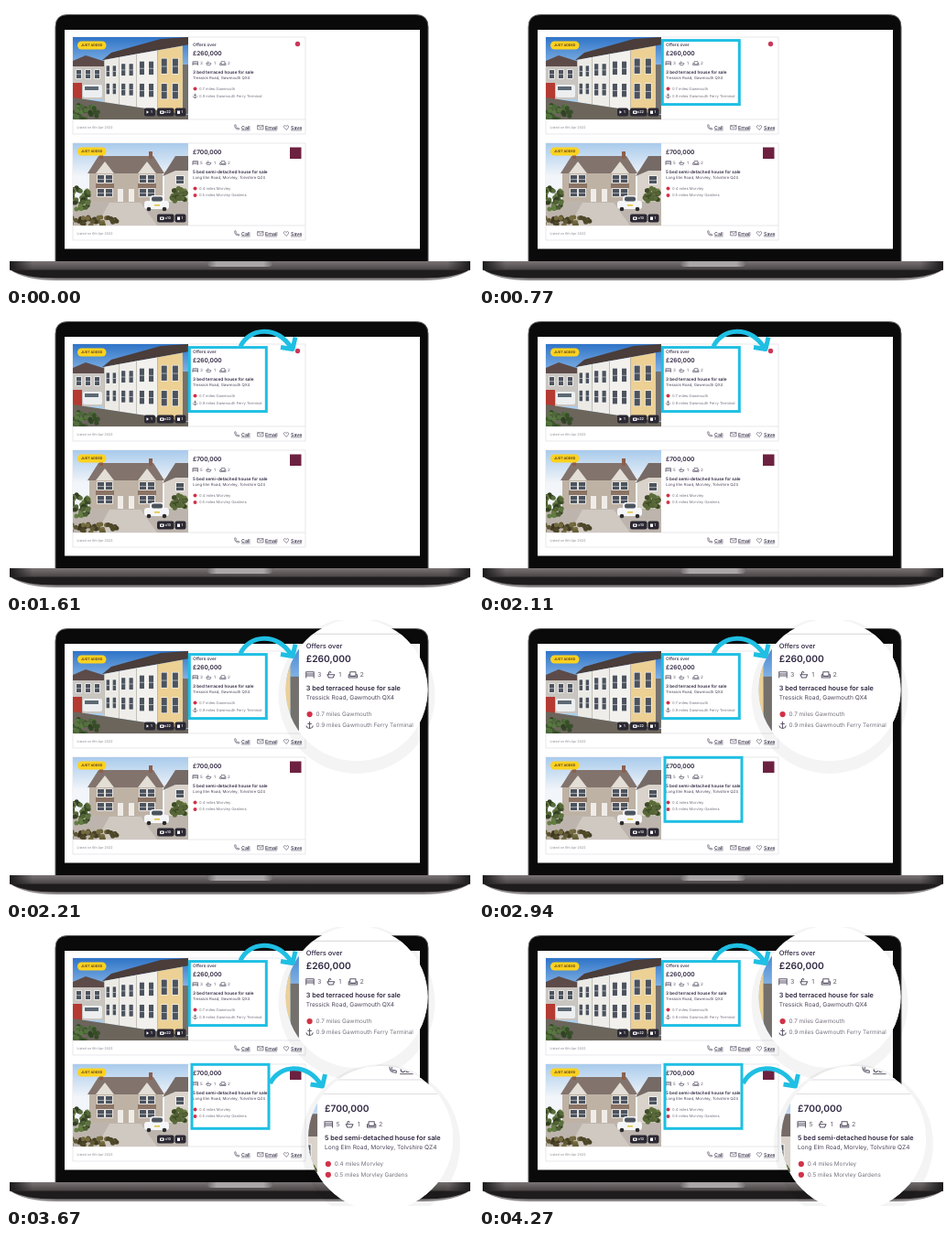
Recreate the animation shown at these times as an HTML page. Size 510 px wide and 305 px high, loop 5 s.

```html
<!DOCTYPE html>
<html lang="en">
<head>
<meta charset="utf-8">
<title>Property listings</title>
<style>
  html, body { margin: 0; width: 100%; height: 100%; overflow: hidden; background: #fff; }
  svg { display: block; width: 100%; height: 100%; }
  text { font-family: Inter, sans-serif; text-rendering: geometricPrecision; }
  .line { fill: none; stroke: #5b5468; stroke-width: .65; stroke-linecap: round; stroke-linejoin: round; }
  .blue { fill: none; stroke: #1fbfe3; stroke-width: 3; }
  .arrow { stroke-width: 5; stroke-linejoin: round; }
</style>
</head>
<body>
<svg viewBox="0 0 510 305">
  <defs>
    <linearGradient id="deck" x2="0" y2="1">
      <stop offset="0" stop-color="#7a7475"/><stop offset="1" stop-color="#484344"/>
    </linearGradient>
    <linearGradient id="ends">
      <stop offset="0" stop-color="#1b191a"/><stop offset=".05" stop-color="#1b191a" stop-opacity="0"/>
      <stop offset=".95" stop-color="#1b191a" stop-opacity="0"/><stop offset="1" stop-color="#1b191a"/>
    </linearGradient>
    <linearGradient id="notch">
      <stop offset="0" stop-color="#6b6667"/><stop offset=".15" stop-color="#aaa5a6"/>
      <stop offset=".85" stop-color="#aaa5a6"/><stop offset="1" stop-color="#6b6667"/>
    </linearGradient>
    <linearGradient id="sky" x2="0" y2="1">
      <stop offset="0" stop-color="#2f74c8"/><stop offset=".5" stop-color="#a9cff1"/>
    </linearGradient>
    <linearGradient id="haze" x2="0" y2="1">
      <stop offset="0" stop-color="#a9cbec"/><stop offset=".4" stop-color="#f2f5f9"/>
    </linearGradient>
    <clipPath id="photoClip"><rect width="126" height="90"/></clipPath>
  </defs>

  <g id="laptop">
    <path d="M54 280V23Q54 9.500 67.500 9.500H447.500Q461 9.500 461 23V280Z" fill="#0b0a0b" stroke="#5d5a5e"/>
    <path d="M64 26H452V265.500H64Z" fill="#fff"/>
    <path d="M4 288H507Q490 300 455 300H55Q20 300 4 288Z" fill="#8d8889"/>
    <path d="M4 288H507Q490 297.500 455 297.500H55Q20 297.500 4 288Z" fill="#1f1c1d"/>
    <path d="M4 279H507V288.500H4Z" fill="url(#deck)"/>
    <path d="M4 279H507V288.500H4Z" fill="url(#ends)"/>
    <path d="M219 279H292Q292 285 286 285H225Q219 285 219 279Z" fill="url(#notch)"/>
  </g>
  <g id="page"></g>
  <g id="overlays"></g>
</svg>
<script>
const LOOP = 5000;
const ZOOM = 1.55;
const INK = '#2f2640', GREY = '#77727f';
const byId = id => document.getElementById(id);
const repeat = (n, draw) => Array.from({ length: n }, (_, i) => draw(i)).join('');

// Text whose vertical centre sits on y
const label = (x, y, size, str, fill = INK, weight = 400, extra = '') =>
  `<text x="${x}" y="${y + size * .36}" font-size="${size}" fill="${fill}" font-weight="${weight}" ${extra}>${str}</text>`;
const box = (x, y, w, h, fill, r = 0) =>
  `<rect x="${x}" y="${y}" width="${w}" height="${h}" rx="${r}" fill="${fill}"/>`;
const disc = (x, y, r, fill) => `<circle cx="${x}" cy="${y}" r="${r}" fill="${fill}"/>`;
const poly = (points, fill) => `<polygon points="${points}" fill="${fill}"/>`;
const line = d => `<path class="line" d="${d}"/>`;
const at = (x, y, content) => `<g transform="translate(${x} ${y})">${content}</g>`;

let seed = 7;
const random = () => (seed = seed * 16807 % 2147483647) / 2147483647;

const pane = (x, y, w, h) => box(x - .7, y - .7, w + 1.4, h + 1.4, '#f7f7f5') +
  box(x, y, w, h, '#4c535e') + box(x, y + h / 2, w, .6, '#dfe2e4');
const bush = (cx, cy, rx, ry, hue) => repeat(40, () => {
  const angle = random() * 2 * Math.PI, reach = Math.sqrt(random());
  return disc(cx + rx * reach * Math.cos(angle), cy + ry * reach * Math.sin(angle), 2.5,
    `hsl(${hue} 30% ${18 + 20 * random()}%)`);
});

// Row of houses in perspective, each wider than the one before
function terrace() {
  const eave = x => 31 - x * .18, ground = x => 66 + x * .15;
  const house = i => {
    const x = 34 + 80 * (1.2 ** i - 1), w = 16 * 1.2 ** i, end = x + w;
    const top = eave(x), h = ground(x) - top;
    const wall = i < 3 ? `hsl(45 15% ${91 + i * 1.5}%)` : '#ecd094';
    return poly([x, top, end, eave(end), end, ground(end), x, ground(x)], wall) +
      box(x, top, .8, h, '#b9b4aa') +
      repeat(4, k => pane(x + w * (.16 + .44 * (k % 2)), top + h * (.14 + .42 * (k >> 1)), w * .22, h * .25));
  };
  return box(0, 0, 126, 90, 'url(#sky)') +
    box(0, 30, 36, 38, '#c9c5c1') + poly('0,26 14,20 36,27 36,32 0,32', '#5d4b49') +
    repeat(3, i => pane(4 + i * 10, 36, 5, 9)) +
    box(0, 50, 10, 20, '#b53a32') + box(11, 52, 21, 14, '#eceeef', 2) + box(13, 54, 15, 4, '#5d6973') +
    poly([32, eave(32), 42, 17, 96, 2, 126, 0, 126, eave(126)], '#4a3d3a') +
    repeat(4, house) + box(120, 30, 6, 54, '#74706c') +
    poly([0, 66, 30, ground(30), 126, ground(126), 126, 90, 0, 90], '#6b655c') +
    bush(10, 82, 18, 9, 95);
}

// A pair of mirrored house halves behind a drive
function semi() {
  const half = box(0, 30, 40, 35, '#beb2a5') + poly('0,14 30,14 42,33 0,33', '#82736d') +
    box(25, 9, 4, 8, '#8c5f4d') + poly('13,33 23,20 33,33', '#e3ded6') +
    box(13, 44, 20, 5, '#8b7465') + box(3, 50, 6, 15, '#efece8') +
    repeat(4, k => pane(15 + 9 * (k % 2), 35 + 15 * (k >> 1), 7, 8));
  const car = box(0, 6, 27, 9, '#f5f6f7', 3) + box(6, 0, 16, 10, '#f5f6f7', 4) +
    box(8, 1.5, 12, 5, '#4b535d', 2) + disc(5, 15, 2.3, '#2b2b2e') + disc(22, 15, 2.3, '#2b2b2e') +
    box(11, 10, 6, 1.6, '#e1c543');
  return box(0, 0, 126, 90, 'url(#haze)') +
    box(100, 30, 26, 36, '#d9d3cb') + poly('98,36 112,14 126,14 126,30 112,30', '#756a66') + pane(113, 36, 8, 8) +
    at(58, 0, half + `<g transform="scale(-1 1)">${half}</g>`) +
    box(0, 64, 126, 26, '#bdb5ad') + poly('40,65 74,65 92,90 26,90', '#d0c9c2') +
    bush(8, 60, 11, 13, 85) + bush(116, 57, 9, 8, 80) + bush(20, 85, 28, 5, 48) + at(78, 57, car);
}

const counter = (x, w, str, icon) => at(x, 77.5,
  box(0, 0, w, 9, '#2b2833', 2) + icon + label(w - 3.5, 4.5, 3.8, str, '#fff', 600, 'text-anchor="end"'));
const photo = (scene, shots, video) => `<g clip-path="url(#photoClip)">${scene}</g>` +
  box(5, 4.5, 31.5, 9, '#fdd21f', 4.5) +
  label(20.7, 9, 3.7, 'JUST ADDED', '#4a3327', 600, 'text-anchor="middle"') +
  (video ? counter(78, 12, '1', poly('2.5,2.7 5,4.5 2.5,6.3', '#fff')) : '') +
  counter(92, 18.5, shots, box(3, 3, 4.6, 3.4, '#fff', .8) + disc(5.3, 4.7, 1, '#2b2833')) +
  counter(111.5, 12, '1', box(2.5, 3, 3, 3.4, '#fff'));

const icons = {
  bed: line('M0 2V-2H5.500V2M0 .800H5.500M0-.600H5.500'),
  bath: line('M0 0H5L4 2H1ZM1 0V-1.500Q1.800-2.700 2.500-1.500'),
  sofa: line('M1 0V-2H5V0M0 0H1V1H5V0H6V2H0Z'),
  anchor: line('M0-2.300V2.300M-1.200-.800H1.200M-2.300 .600Q-2 2.300 0 2.300Q2 2.300 2.300 .600'),
  phone: line('M-2.300-2.400Q-2.500 2.500 2.500 2.300V1L1 .500L0 1L-1-.500L-.500-1.500L-1.200-2.700Z'),
  mail: line('M-3-2H3V2.200H-3ZM-3-2L0 .600L3-2'),
  heart: line('M0 2.600L-2.500 0C-3.500-1.300-1.500-3.500 0-1.200C1.500-3.500 3.500-1.300 2.500 0Z')
};
const station = disc(0, 0, 2, '#d03348');

const action = (x, icon, str, width) =>
  at(x, 98.7, icons[icon] + label(5, 0, 5.3, str, INK, 500) + box(5, 3, width, .5, INK));
const room = (i, icon, count) =>
  at(131 + 15 * i, 0, icons[icon] + label(8, 0, 4.5, count, GREY, 500));
const travel = (y, icon, str) => at(133.5, y, icon + label(4.5, 0, 4.1, str, GREY));

// A listing; everything after the price follows at fixed distances
function card(top, c) {
  const price = c.prefix ? 17.2 : 10;
  return at(73, top,
    `<path d="M0 0H254V106H0ZM0 90H254" fill="#fff" stroke="#dedce1" stroke-width=".7"/>` +
    photo(c.scene, c.shots, c.prefix) + c.badge +
    at(0, price,
      (c.prefix ? label(131, -9, 4.8, c.prefix, INK, 500) : '') +
      label(131, 0, 6.6, c.price, INK, 600) +
      at(0, 11.5, room(0, 'bed', c.beds) + room(1, 'bath', 1) + room(2, 'sofa', 2)) +
      label(131, 20.9, 4.72, c.title, INK, 600) +
      label(131, 27.6, 4.25, c.address, '#4f475c') +
      travel(39.4, station, c.near) + travel(47, c.farIcon, c.far)) +
    label(4.5, 98.7, 3.6, 'Listed on 6th Apr 2022', '#8a8690') +
    action(179, 'phone', 'Call', 9.6) + action(205, 'mail', 'Email', 13) + action(233, 'heart', 'Save', 12));
}

byId('page').innerHTML =
  card(34, {
    scene: terrace(), shots: 'x22', badge: disc(245.5, 7.5, 2.7, '#c9385a'),
    prefix: 'Offers over', price: '£260,000', beds: 3,
    title: '3 bed terraced house for sale', address: 'Tressick Road, Gawmouth QX4',
    near: '0.7 miles Gawmouth', far: '0.9 miles Gawmouth Ferry Terminal', farIcon: icons.anchor
  }) +
  card(150, {
    scene: semi(), shots: 'x10', badge: box(237, 4.5, 12.5, 12.5, '#6d2140'),
    price: '£700,000', beds: 5,
    title: '5 bed semi-detached house for sale', address: 'Long Elm Road, Morvley, Tolvshire QZ4',
    near: '0.4 miles Morvley', far: '0.5 miles Morvley Gardens', farIcon: station
  });

// Round magnifier that puts the page's price line, at height py, on (x, y)
const lens = (id, cx, cy, r, py, x, y) =>
  `<clipPath id="${id}">${disc(cx, cy, r)}</clipPath>
   <g opacity=".045">${disc(cx, cy + 6, r + 8, '#000')}</g>${disc(cx, cy, r, '#fff')}
   <g clip-path="url(#${id})"><use href="#page" transform="translate(${x} ${y}) scale(${ZOOM}) translate(-204 ${-py})"/></g>`;
const frame = (x, y) => `<rect class="blue" x="${x}" y="${y}" width="84" height="70"/>`;
const arrow = (x, y) => at(x, y,
  `<path class="blue arrow" d="M0 0C10-20 39-24 56 2M44 1L57 3L60-10"/>`);

// Hard cut: hidden until the given time, then shown to the end of the loop
function appear(time, content) {
  const layer = document.createElementNS('http://www.w3.org/2000/svg', 'g');
  layer.innerHTML = content;
  byId('overlays').append(layer);
  const offset = time / LOOP;
  layer.animate([
    { opacity: 0, offset: 0 }, { opacity: 0, offset },
    { opacity: 1, offset }, { opacity: 1, offset: 1 }
  ], { duration: LOOP, iterations: Infinity });
}

appear(770, frame(200.3, 37.6));
appear(2940, frame(203, 150.3));
appear(2210, lens('lensA', 383, 76.5, 77.5, 51.2, 327.7, 42));
appear(3670, lens('lensB', 409, 231, 79, 160, 348, 198));
appear(1610, arrow(256, 36.5));
appear(3670, arrow(288.5, 171));
</script>
</body>
</html>
```
